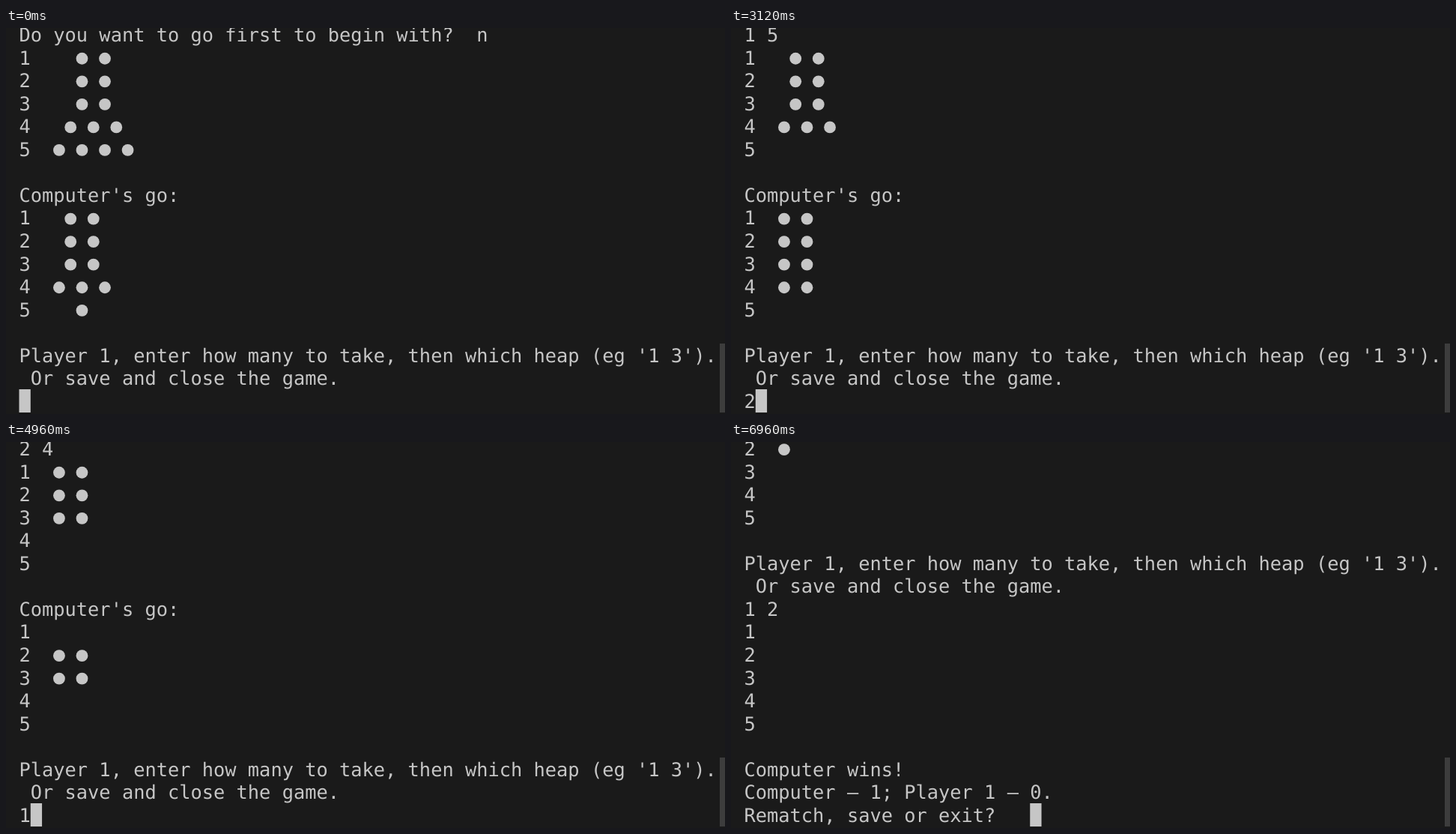
These frames come from a looping animation (960 by 515 pixels, 8000 ms). An HTML page:

```html
<!DOCTYPE html>
<html lang="en">
<head>
<meta charset="utf-8">
<title>Heap game in a terminal</title>
<style>
  html, body { margin: 0; width: 100%; height: 100%; overflow: hidden; background: #1a1a1a; }
  svg { display: block; }
  text {
    font: 25.36px "DejaVu Sans Mono", "Liberation Mono", monospace;
    white-space: pre;
    text-rendering: geometricPrecision;
  }
</style>
</head>
<body>
<svg width="960" height="515" viewBox="0 0 960 515">
  <rect width="960" height="515" fill="#1a1a1a"/>
  <rect x="953" y="421" width="7" height="92" fill="#3d3d3d"/>
  <g id="screen" fill="#c6c6c6"></g>
  <rect id="cursor" y="482" width="15.3" height="31" fill="#c6c6c6"/>
</svg>
<script>
const LOOP = 8000, LEFT = 17.5, CELL = 15.27, ROW = 30.55;
const DOT = "●";
const screen = document.getElementById("screen");
const cursor = document.getElementById("cursor");

// Each heap is centred below the widest one.
function heaps(counts) {
  const widest = Math.max(...counts);
  return counts.map((n, i) =>
    n ? `${i + 1}  ${" ".repeat(widest - n)}${Array(n).fill(DOT).join(" ")}` : `${i + 1}`);
}

const prompt = [
  "Player 1, enter how many to take, then which heap (eg '1 3').",
  " Or save and close the game."
];

const turn = (entry, before, after) =>
  [entry, ...heaps(before), "", "Computer's go:", ...heaps(after), "", ...prompt];

const scenes = [
  { start: 0, keys: [480, 880, 1360], typed: "1 5",
    lines: turn("Do you want to go first to begin with?  n", [2, 2, 2, 3, 4], [2, 2, 2, 3, 1]) },
  { start: 1600, keys: [3120, 3520, 3840], typed: "2 4",
    lines: turn("1 5", [2, 2, 2, 3, 0], [2, 2, 2, 2, 0]) },
  { start: 4000, keys: [4960, 5120, 5280], typed: "1 2",
    lines: turn("2 4", [2, 2, 2, 0, 0], [0, 2, 2, 0, 0]) },
  { start: 5520, keys: [6400, 6560, 6720], typed: "1 2",
    lines: turn("1 2", [0, 1, 2, 0, 0], [0, 1, 0, 0, 0]) },
  { start: 6960, keys: [], typed: "", input: "Rematch, save or exit?   ",
    lines: [...heaps([0, 1, 0, 0, 0]).slice(1), "", ...prompt, "1 2",
      ...heaps([0, 0, 0, 0, 0]), "", "Computer wins!", "Computer – 1; Player 1 – 0."] }
];

function drawLine(line, row) {
  const words = line.replaceAll(DOT, " ").trimEnd();
  let out = words ? `<text x="${LEFT}" y="${18 + row * ROW}">${words}</text>` : "";
  [...line].forEach((char, col) => {
    if (char === DOT)
      out += `<circle cx="${LEFT + (col + 0.5) * CELL}" cy="${10.2 + row * ROW}" r="7.9"/>`;
  });
  return out;
}

let shown = "";
function render(time) {
  const scene = scenes.findLast(s => s.start <= time);
  const count = scene.keys.filter(key => key <= time).length;
  const state = `${scene.start}/${count}`;
  if (state === shown) return;
  shown = state;
  const input = (scene.input || "") + scene.typed.slice(0, count);
  screen.innerHTML = [...scene.lines, input].map(drawLine).join("");
  cursor.setAttribute("x", LEFT + input.length * CELL);
}

const began = performance.now();
function tick() {
  render((performance.now() - began) % LOOP);
  requestAnimationFrame(tick);
}
tick();
</script>
</body>
</html>
```
